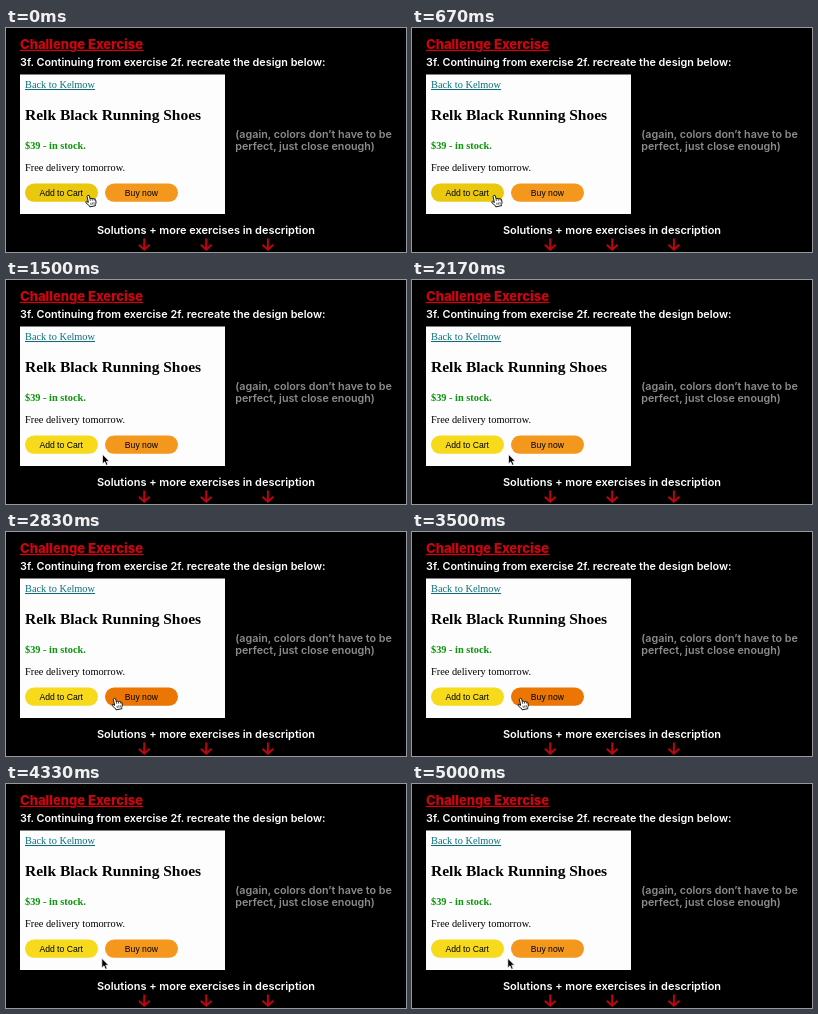
Recreate the animation shown at these times as an HTML page. Size 400 by 224 pixels, loop 5170 ms.

```html
<!DOCTYPE html>
<html lang="en">
<head>
<meta charset="utf-8">
<title>Challenge Exercise</title>
<style>
  html, body { margin: 0; width: 100%; height: 100%; overflow: hidden; background: #000; }
  svg { display: block; width: 400px; height: 224px; }
  text { white-space: pre; }
  .ui { font-family: Inter, Roboto, sans-serif; font-weight: 600; fill: #fff; }
  .title { font-size: 13px; font-weight: 800; fill: #ce0410; text-decoration: underline; }
  .task { font-size: 10.82px; }
  .note { font-size: 10.75px; fill: #8c8c8c; }
  .more { font-size: 10.98px; text-anchor: middle; }
  .page { font-family: "Liberation Serif", "Times New Roman", serif; font-size: 10.33px; fill: #000; }
  .link { fill: #0b7078; text-decoration: underline; }
  .name { font-size: 15.5px; font-weight: 700; }
  .price { font-weight: 700; fill: #0a960a; }
  .label { font-family: "Liberation Sans", Arial, sans-serif; font-size: 8.65px; fill: #000; text-anchor: middle; }
  .arrows { fill: none; stroke: #c0040e; stroke-width: 1.9; }
</style>
</head>
<body>
<svg viewBox="0 0 400 224">
  <rect width="400" height="224" fill="#000"/>
  <text class="ui title" x="14" y="20.8">Challenge Exercise</text>
  <text class="ui task" x="14" y="38">3f. Continuing from exercise 2f. recreate the design below:</text>

  <rect x="14" y="46.5" width="205" height="139.5" fill="#fdfdfd"/>
  <text class="page link" x="19" y="60">Back to Kelmow</text>
  <text class="page name" x="19" y="92">Relk Black Running Shoes</text>
  <text class="page price" x="19" y="120.5">$39 - in stock.</text>
  <text class="page" x="19" y="143">Free delivery tomorrow.</text>

  <rect id="add" x="19" y="155.5" width="73" height="18.3" rx="9.1"/>
  <text class="label" x="55.2" y="167.7">Add to Cart</text>
  <rect id="buy" x="99" y="155.5" width="73" height="18.3" rx="9.1"/>
  <text class="label" x="135.4" y="167.7">Buy now</text>

  <text class="ui note" x="229.3" y="110">(again, colors don’t have to be</text>
  <text class="ui note" x="229.3" y="122.2">perfect, just close enough)</text>

  <text class="ui more" x="200" y="206">Solutions + more exercises in description</text>
  <path class="arrows" d="M138.2 210.5v11.2m-5.4 -5l5.4 5l5.4 -5
    M200.2 210.5v11.2m-5.4 -5l5.4 5l5.4 -5
    M261.9 210.5v11.2m-5.4 -5l5.4 5l5.4 -5"/>

  <g id="cursor">
    <path id="pointer" fill="#000" stroke="#fff" stroke-width=".7" stroke-linejoin="round"
      d="M0 0V9.6L2.2 7.5L3.7 11L5.4 10.3L3.9 6.9H6.8Z"/>
    <g id="hand" transform="rotate(-12)" stroke="#111" stroke-width=".9" stroke-linejoin="round">
      <path fill="#fff" d="M-1.2 1.1Q0 -.8 1.2 1.1V4.2Q2.4 3.3 3.2 4.6Q4.5 3.9 5 5.2
        Q6.3 4.8 6.4 6.2V8.4Q6.2 10 5.2 10.8V12H-.7V11Q-2 9.6 -3.6 7.2
        Q-4.1 5.8 -2.8 5.9L-1.2 7.3Z"/>
      <path fill="none" stroke-width=".6" d="M1.2 4.2V6.3M3.2 4.6V6.5M5 5.2V6.7M1 8.2V10.4M2.6 8.2V10.4M4.2 8.2V10.4"/>
    </g>
  </g>
</svg>
<script>
  const LOOP = 5170, STEP = 1000 / 6, MOVE = 300;
  const get = id => document.getElementById(id);
  const cursor = get('cursor'), pointer = get('pointer'), hand = get('hand');
  const buttons = [
    { el: get('add'), x: 19, rest: '#f7da1b', hover: '#eac80d' },
    { el: get('buy'), x: 99, rest: '#f4981d', hover: '#eb7603' }
  ];
  // start of each move and the place it leads to
  const stops = [
    { t: -MOVE, x: 82, y: 167 },
    { t: 1000, x: 96.5, y: 174.3 },
    { t: 2200, x: 108.3, y: 166 },
    { t: 3750, x: 95.8, y: 174.3 }
  ];

  const ease = p => p * p * (3 - 2 * p);

  function place(t) {
    let i = stops.length - 1;
    while (t < stops[i].t) i--;
    const to = stops[i], from = stops[Math.max(0, i - 1)];
    const p = ease(Math.min(1, (t - to.t) / MOVE));
    return { x: from.x + (to.x - from.x) * p, y: from.y + (to.y - from.y) * p };
  }

  function draw(now) {
    const time = now % LOOP;
    const { x, y } = place(Math.floor((time + 4) / STEP) * STEP);
    let over = false;
    for (const b of buttons) {
      const hit = x >= b.x && x <= b.x + 73 && y >= 155.5 && y <= 173.8;
      b.el.setAttribute('fill', hit ? b.hover : b.rest);
      over = over || hit;
    }
    hand.style.display = over ? '' : 'none';
    pointer.style.display = over ? 'none' : '';
    cursor.setAttribute('transform', `translate(${x} ${y})`);
  }

  const start = performance.now();
  function tick() {
    draw(performance.now() - start);
    requestAnimationFrame(tick);
  }
  tick();
</script>
</body>
</html>
```
